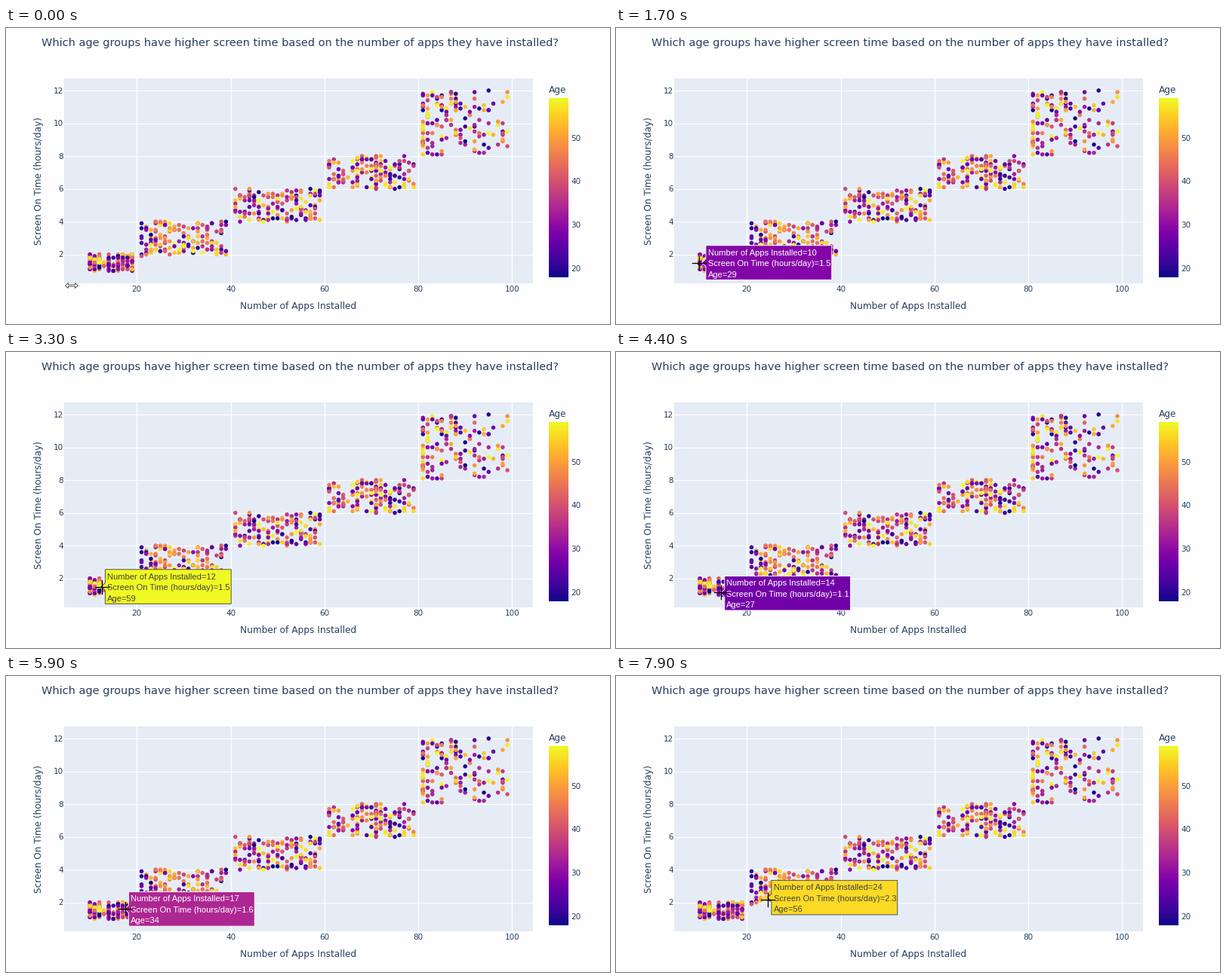
A matplotlib script for the animation above (8000 ms loop, 800 px wide and 393 px high).

```python
import matplotlib.pyplot as plt
import numpy as np
from matplotlib.animation import FuncAnimation
from matplotlib.patches import Polygon, Rectangle

W, H, DPI = 800, 393, 64
FRAMES, STEP = 80, 100
PT = 72 / DPI  # points per pixel
INK = "#2a3f5f"
plasma = plt.get_cmap("plasma")

# Pointer stops: seconds, x, y, then the apps, hours and age hovered there
STOPS = np.array([
    (1.7, 109.5, 312, 10, 1.5, 29), (3.3, 127, 312, 12, 1.5, 59),
    (4.4, 139, 319, 14, 1.1, 27), (5.9, 158, 309, 17, 1.6, 34),
    (7.0, 173, 309, 19, 1.6, 30), (7.9, 201, 297, 24, 2.3, 56),
])
REST = (0.3, 87, 342)

fig = plt.figure(figsize=(W / DPI, H / DPI), dpi=DPI, facecolor="#fefefe")
ax = fig.add_axes([0, 0, 1, 1])
ax.axis("off")


def px(apps):
    return 49.05 + 6.2125 * apps


def py(hours):
    return 344.2 - 21.77 * hours


def age_color(age):
    return plasma((np.asarray(age) - 18) / 41)


def label(x, y, s, size, color=INK, font="DejaVu Sans", **kw):
    return ax.text(x, y, s, fontsize=size * PT, color=color, family=font, **kw)


def hovered(apps):
    """Hours and age of the point the pointer meets in a column."""
    hours, age = (np.interp(apps, STOPS[:, 3], STOPS[:, k]) for k in (4, 5))
    return round(hours, 1), round(age)


def make_points(n=140):
    rng = np.random.default_rng(12)
    levels = (1, 2, 4, 6, 8, 12)
    groups = []
    for k, (low, high) in enumerate(zip(levels, levels[1:])):
        first = max(10, 20 * k + 1)
        spread = rng.random(n) ** (1.5 if k == 4 else 1)  # thins out at the end
        groups.append(np.column_stack([
            first + np.floor(spread * (20 * k + 20 - first)),
            np.round(rng.uniform(low, high, n), 1),
            rng.integers(18, 60, n),
        ]))
    groups.append([(a, *hovered(a)) for a in range(10, 25) if a != 20])
    return np.vstack(groups)


def draw_chart():
    ax.add_patch(Rectangle((77, 67), 621, 272, fc="#e5ecf6", lw=0))
    for v in range(20, 101, 20):
        ax.plot([px(v)] * 2, [67, 339], color="white", lw=1.4 * PT)
        label(px(v), 350.4, str(v), 10.35, ha="center")
    for v in range(2, 13, 2):
        ax.plot([77, 698], [py(v)] * 2, color="white", lw=1.2 * PT)
        label(76, py(v) + 3.8, str(v), 10.35, ha="right")

    apps, hours, age = make_points().T
    ax.scatter(px(apps), py(hours), s=(5.5 * PT) ** 2, c=age_color(age),
               linewidths=0, zorder=3)

    label(47, 23.6, "Which age groups have higher screen time based on the "
          "number of apps they have installed?", 14.47)
    label(387.5, 373.4, "Number of Apps Installed", 12.08, ha="center")
    label(50.4, 203, "Screen On Time (hours/day)", 12.08, rotation=90,
          ha="right", va="center")

    ramp = np.linspace(1, 0, 256)[:, None]
    ax.imshow(ramp, cmap=plasma, extent=(719, 745, 331, 93.5), aspect="auto")
    label(719, 86.2, "Age", 12.08)
    for v in range(20, 51, 10):
        label(748, 331 - (v - 18) * 237 / 41 + 3.6, str(v), 10.35)
    ax.set_xlim(0, W)
    ax.set_ylim(H, 0)


draw_chart()

box = ax.add_patch(Polygon([(0, 0)] * 3, lw=0.9 * PT, zorder=5))
lines = [label(0, 0, "", 11.15, font="Liberation Sans", zorder=6)
         for _ in range(3)]
cross = [ax.plot([], [], color="black", lw=1.3 * PT, zorder=7)[0]
         for _ in range(2)]
resize = ax.add_patch(Polygon([(0, 0)] * 3, fc="white", ec="#333333",
                              lw=0.8 * PT, zorder=7))


def show_tip(apps, hours, age):
    x, y = px(apps), py(hours)
    left, right, half = x + 7.8, x + 174.6, 22.8
    box.set_xy([(x + 2.6, y), (left, y + 5.2), (left, y + half),
                (right, y + half), (right, y - half), (left, y - half),
                (left, y - 5.2)])
    fill = age_color(age)
    dark = np.dot(fill[:3], (0.299, 0.587, 0.114)) < 0.5
    ink = "white" if dark else "#444444"
    box.set_facecolor(fill)
    box.set_edgecolor(ink)
    rows = (f"Number of Apps Installed={apps}",
            f"Screen On Time (hours/day)={hours}", f"Age={age}")
    for i, (line, s) in enumerate(zip(lines, rows)):
        line.set_position((x + 10.4, y - 10 + 14.5 * i))
        line.set_text(s)
        line.set_color(ink)


def show_pointer(x, y):
    inside = y < 339
    resize.set_visible(not inside)
    half = np.array([(-4.5, -3.5), (-8.5, 0), (-4.5, 3.5), (-4.5, 1)])
    shaft = np.array([(-4.5, -1)])
    left = np.vstack([shaft, half])
    resize.set_xy(np.vstack([left, -left]) + (x, y))
    cross[0].set_data([x - 9, x + 9], [y, y])
    cross[1].set_data([x, x], [y - 9, y + 9])
    for c in cross:
        c.set_visible(inside)


def update(i):
    t = i * STEP / 1000
    path = np.vstack([REST, STOPS[:, :3]])
    x, y = (np.interp(t, path[:, 0], path[:, k]) for k in (1, 2))
    show_pointer(x, y)

    over = x > 100
    for a in (box, *lines):
        a.set_visible(over)
    if over:
        apps = int(np.interp(t, STOPS[:, 0], STOPS[:, 3]) + 1e-6)
        apps -= apps == 20  # no points in this column
        show_tip(apps, *hovered(apps))
    return [box, *lines, *cross, resize]


anim = FuncAnimation(fig, update, frames=FRAMES, interval=STEP, repeat=True,
                     repeat_delay=0, blit=False)
plt.show()
```
